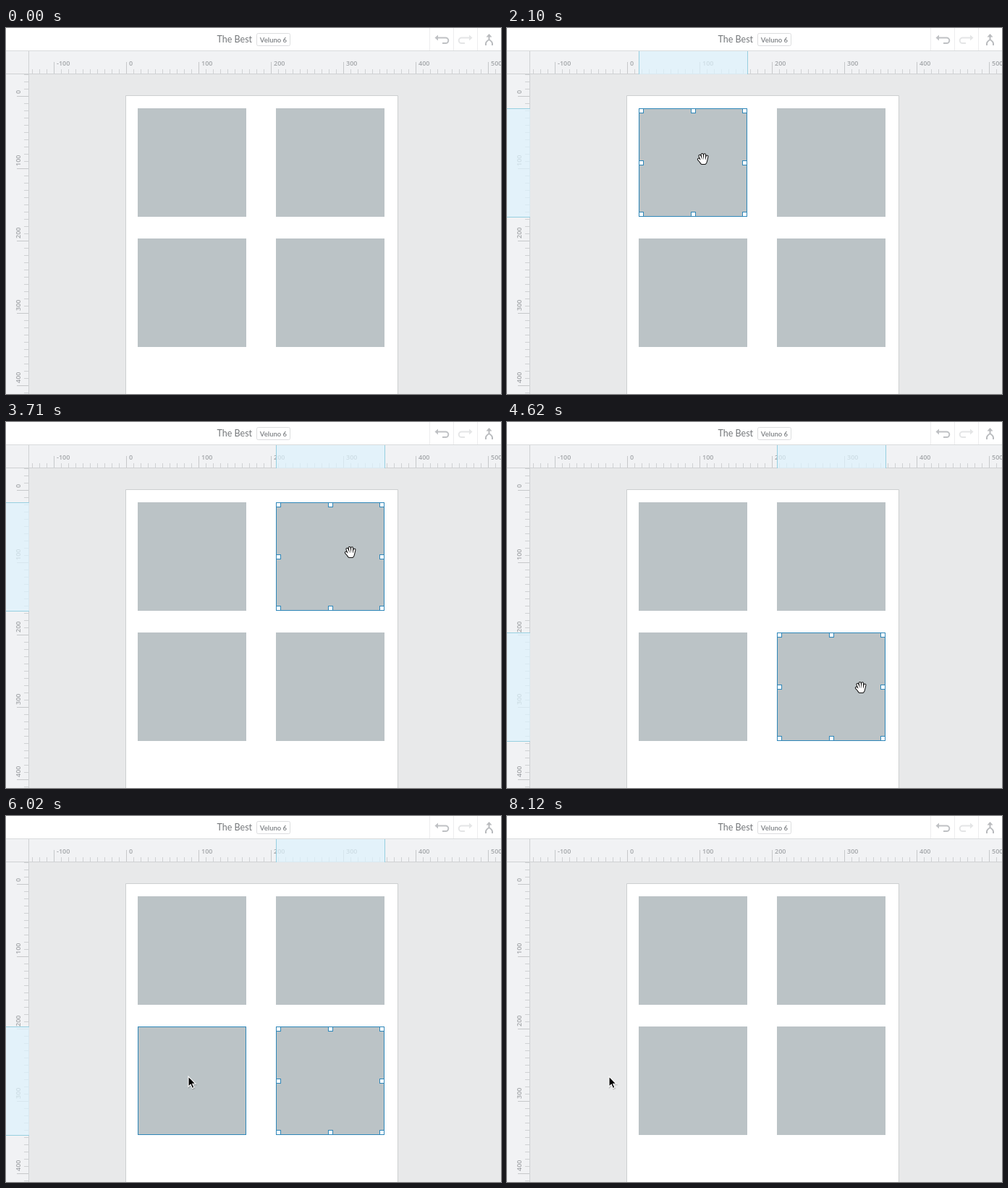
Recreate the animation shown at these times as an HTML page. Size 684 px wide and 506 px high, loop 8750 ms.

```html
<!DOCTYPE html>
<html lang="en">
<head>
<meta charset="utf-8">
<title>Artboard selection</title>
<style>
  html, body { margin: 0; width: 100%; height: 100%; overflow: hidden; background: #e8e9ea; }
  svg { display: block; width: 684px; height: 506px; }
  .crisp { shape-rendering: crispEdges; }
  .label { font: 600 9px "Open Sans", "Noto Sans", sans-serif; fill: #a3a6a9; }
  .title { font: 12.5px Lato, sans-serif; fill: #74777a; }
  .badge { font: bold 9.5px Lato, sans-serif; fill: #8a8d90; }
</style>
</head>
<body>
<svg id="stage" viewBox="0 0 684 506" xmlns="http://www.w3.org/2000/svg">
  <rect width="684" height="506" fill="#e8e9ea"/>
  <rect x="165" y="93" width="377" height="420" rx="1" fill="#cdcfd0"/>
  <rect x="166" y="94" width="375" height="420" fill="#fff"/>
  <g id="boxes" class="crisp"></g>
  <g id="marks" class="crisp"></g>

  <g class="crisp">
    <rect y="32" width="684" height="32" fill="#f1f2f4"/>
    <rect y="32" width="32" height="474" fill="#f1f2f4"/>
    <rect y="63" width="684" height="1" fill="#cfd1d3"/>
    <rect x="31" y="32" width="1" height="474" fill="#cfd1d3"/>
  </g>
  <g id="ticks" class="crisp"></g>
  <g id="labels" class="label"></g>
  <g id="spans" class="crisp"></g>

  <g class="crisp">
    <rect width="684" height="31" fill="#fff"/>
    <rect y="31" width="684" height="1" fill="#d9dbdc"/>
    <path d="M585.5 0V31M618.5 0V31M651.5 0V31" stroke="#ededee"/>
  </g>
  <text class="title" x="291.5" y="20">The Best</text>
  <rect x="346.5" y="7.5" width="46" height="17" rx="2" fill="#fff" stroke="#dcdddf"/>
  <text class="badge" x="369.5" y="19.5" text-anchor="middle">Veluno 6</text>
  <g fill="none" stroke-width="2">
    <g id="undo" stroke="#bfc1c4">
      <path d="M595 13.5H607.5a3.8 3.8 0 0 1 0 7.6H603"/>
      <path d="M597 9.5L592.5 13.5L597 17.5Z" fill="#bfc1c4" stroke="none"/>
    </g>
    <g stroke="#e4e5e6">
      <path d="M642 13.5H629.5a3.8 3.8 0 0 0 0 7.6H634"/>
      <path d="M640 9.5L644.5 13.5L640 17.5Z" fill="#e4e5e6" stroke="none"/>
    </g>
    <path d="M667.5 11V16M663 24V21.5Q663 19 667.5 16Q672 19 672 21.5V24" stroke="#b9bbbe"/>
    <path d="M663.5 12.5L667.5 8L671.5 12.5Z" fill="#b9bbbe"/>
  </g>

  <g id="arrow">
    <path d="M0 0V14.2L3.2 11.2L5.4 16.4L7.9 15.3L5.7 10.3H10Z" transform="translate(.6 1.2)" fill="#000" stroke="#000" stroke-width="1.6" opacity=".15"/>
    <path d="M0 0V14.2L3.2 11.2L5.4 16.4L7.9 15.3L5.7 10.3H10Z" fill="#000" stroke="#fff" stroke-width="1.1"/>
  </g>
  <g id="hand" stroke-linecap="round" stroke-linejoin="round"></g>
</svg>
<script>
const LOOP = 8750, STEP = 70, SIZE = 150;
const $ = id => document.getElementById(id);

function add(parent, tag, attrs, text) {
  const el = document.createElementNS("http://www.w3.org/2000/svg", tag);
  for (const key in attrs) el.setAttribute(key, attrs[key]);
  if (text !== undefined) el.textContent = text;
  return parent.appendChild(el);
}
const rect = (parent, x, y, width, height, fill) =>
  add(parent, "rect", { x, y, width, height, fill });

// Rulers: minor ticks every 10, labelled ticks every 100
function buildRulers() {
  for (let v = -130; v <= 510; v += 10) {
    const major = v % 100 === 0, len = major ? 16 : 6;
    const color = major ? "#c6c8ca" : "#cfd1d3";
    const x = 166 + v, y = 94 + v;
    rect($("ticks"), x, 63 - len, 1, len, color);
    if (y >= 64 && y < 506) rect($("ticks"), 31 - len, y, len, 1, color);
    if (!major) continue;
    add($("labels"), "text", { x: x + 4, y: 52 }, v);
    if (y > 64) add($("labels"), "text", { transform: `translate(20 ${y - 3}) rotate(-90)` }, v);
  }
}

const boxes = [[182, 111], [373, 111], [182, 291], [373, 291]];
const BLUE = "#2f87b9";

function buildOutline() {
  const g = add($("marks"), "g", {});
  add(g, "rect", { x: .5, y: .5, width: SIZE - 1, height: SIZE - 1, fill: "none", stroke: BLUE });
  return g;
}

function buildSelection() {
  const g = buildOutline(), spots = [.5, 72.5, 143.5];
  for (const x of spots) for (const y of spots) {
    if (x === 72.5 && y === 72.5) continue;
    add(g, "rect", { x, y, width: 6, height: 6, fill: "#fff", stroke: BLUE });
  }
  return g;
}

function buildSpan(across) {
  const g = add($("spans"), "g", {});
  const bar = (pos, len, fill) =>
    across ? rect(g, pos, 32, len, 32, fill) : rect(g, 0, pos, 32, len, fill);
  bar(0, SIZE + 1, "rgba(222,243,252,.72)");
  bar(0, 1, "#97cfe0");
  bar(SIZE, 1, "#97cfe0");
  return g;
}

function buildHand() {
  const d = "M-4.6-4.2L-2 2M-1.3-6L-.2 1M2.1-5.8L2 1M5.5-3.4L4 3" +
            "M-6.1.6L-3 4M-3 2H4L3.6 4.5L2.6 6H-1.8L-3.6 3.5Z";
  add($("hand"), "path", { d, fill: "#111", stroke: "#111", "stroke-width": 4 });
  add($("hand"), "path", { d, fill: "#fff", stroke: "#fff", "stroke-width": 2 });
}

buildRulers();
boxes.forEach(([x, y]) => rect($("boxes"), x, y, SIZE, SIZE, "#bbc3c6"));
const hover = buildOutline(), selection = buildSelection();
const spanX = buildSpan(true), spanY = buildSpan(false);
buildHand();

// [time, selected box]
const picks = [[0, -1], [1400, 0], [3010, 1], [4550, 3], [6160, 2], [8120, -1]];
const rulerPicks = [[0, -1], [1470, 0], [3010, 1], [4620, 3], [6230, 2], [8120, -1]];

// Pointer moves: start, steps, from, to, sag
const moves = [
  [770, 8, [33, 212], [270, 179], 0],
  [2100, 9, [270, 179], [476, 177], 0],
  [3710, 9, [476, 177], [489, 365], 0],
  [5320, 1, [489, 365], [488, 365], 0],
  [5460, 9, [488, 365], [252, 360], 0],
  [7210, 9, [252, 360], [141, 360], 3]
];

const latest = (list, t) => list.filter(e => e[0] <= t).pop();
const ease = p => p < .5 ? 4 * p ** 3 : 1 - 4 * (1 - p) ** 3;

function pointerAt(t) {
  const move = latest(moves, t);
  if (!move) return null;
  const [start, steps, a, b, sag] = move;
  const p = ease(Math.min(1, (Math.floor((t - start) / STEP) + 1) / steps));
  return [
    Math.round(a[0] + (b[0] - a[0]) * p),
    Math.round(a[1] + (b[1] - a[1]) * p + sag * Math.sin(Math.PI * p))
  ];
}

function place(el, shown, x, y) {
  el.style.display = shown ? "" : "none";
  if (shown) el.setAttribute("transform", `translate(${x} ${y})`);
}

function draw(t) {
  const picked = latest(picks, t)[1], ruled = latest(rulerPicks, t)[1];
  const pos = pointerAt(t), [px, py] = pos || [-99, -99];
  const over = boxes.findIndex(([x, y]) => px >= x && px < x + SIZE && py >= y && py < y + SIZE);
  const grab = over >= 0 && over === picked;

  place(hover, over >= 0 && !grab, ...(boxes[over] || []));
  place(selection, picked >= 0, ...(boxes[picked] || []));
  const [rx, ry] = boxes[ruled] || [0, 0];
  place(spanX, ruled >= 0, rx, 0);
  place(spanY, ruled >= 0, 0, ry);
  place($("arrow"), pos && !grab, px, py);
  place($("hand"), pos && grab, px, py + 2);
}

const begin = performance.now();
function tick() {
  draw((performance.now() - begin) % LOOP);
  requestAnimationFrame(tick);
}
tick();
</script>
</body>
</html>
```
